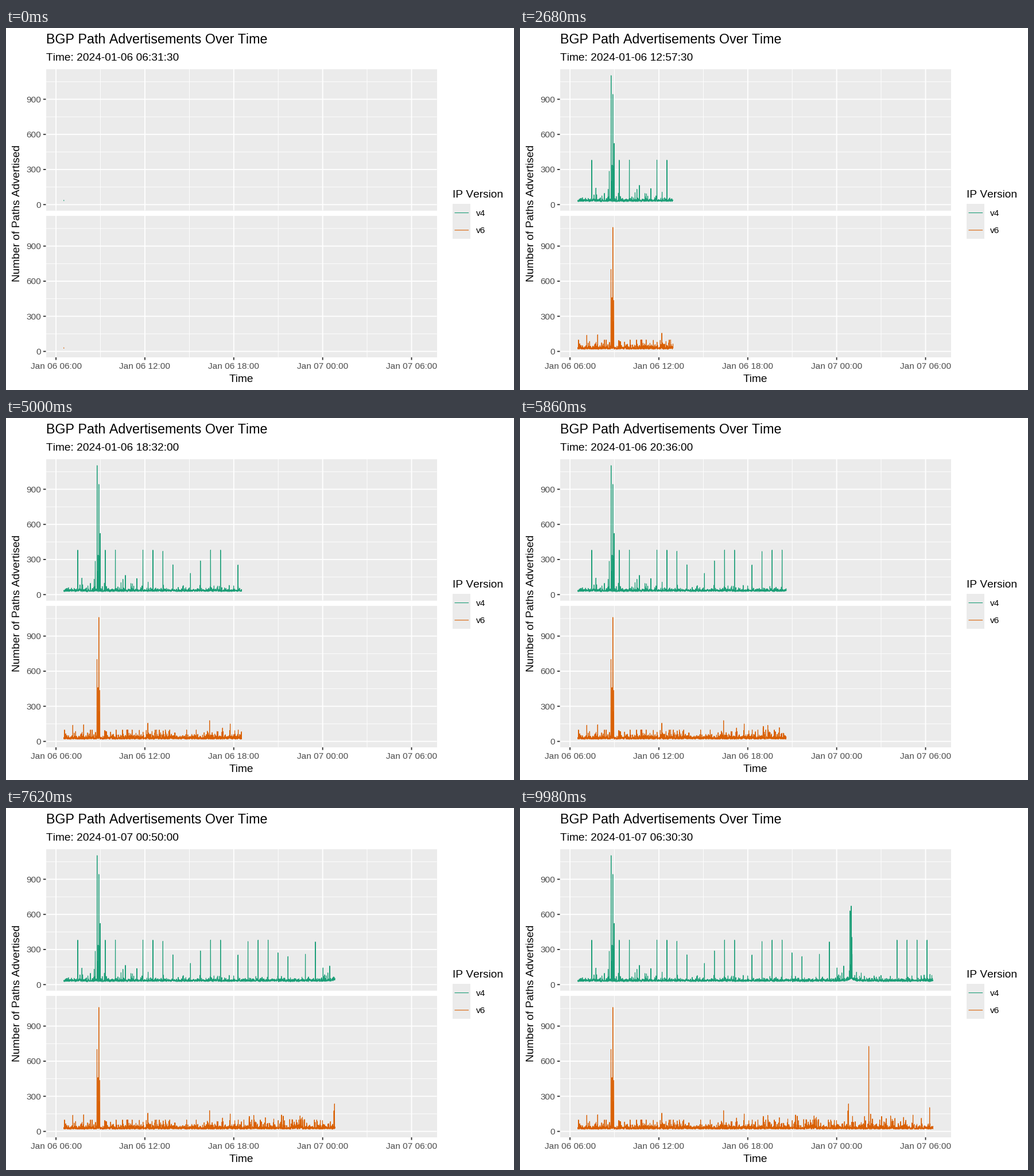
Recreate the animation shown at these times as a matplotlib script. Size 885 by 632 pixels, loop 10000 ms.

```python
import numpy as np
import matplotlib.pyplot as plt
from matplotlib.animation import FuncAnimation
from matplotlib.patches import Rectangle

plt.rcParams.update({
    "font.family": "Liberation Sans",
    "text.kerning_factor": 6,
    "path.simplify": False,
})

W, H, DPI = 885, 632, 100
FRAMES, INTERVAL = 500, 20
SAMPLES = 2879               # one sample every 30 s
START = 6 * 3600 + 31 * 60 + 30

LEFT, RIGHT = 69.7, 750.6
TOP, BOTTOM = 71.6, 318.5
PANEL_STEP = 256.3
ZERO_Y, UNIT = 308.3, 0.2043
X0 = LEFT + (RIGHT - LEFT) / 22
DX = (RIGHT - LEFT) / 1.1 / (SAMPLES - 1)

GREEN, ORANGE = "#1B9E77", "#D95F02"
PANEL, TICK, LABEL = "#EBEBEB", "#333333", "#4D4D4D"
BASE, SMALL, TITLE = 19.15, 15.45, 23.2
LINE = 1.12

# Main outliers: (x position, paths advertised)
V4_PEAKS = [(155.5, 285), (158.8, 1103), (161.8, 942), (164, 523),
            (575, 630), (577, 672), (578.6, 260)]
V6_PEAKS = [(158.4, 700), (160.2, 460), (161.8, 1060), (163.4, 435),
            (572.3, 235), (607.6, 727)]

# Evenly spaced v4 spikes: (first x, count, first height, last height)
TRAIN_STEP, TRAIN_CAP = 17.45, 380
TRAINS = [(125, 1, 380, 380), (173, 3, 600, 165), (238.5, 4, 600, 255),
          (321.4, 4, 182, 500), (404.2, 4, 253, 600), (473.8, 2, 272, 240),
          (521.6, 2, 260, 365), (656.8, 4, 400, 380)]

xs = X0 + DX * np.arange(SAMPLES)


def index(x):
    return round((x - X0) / DX)


def add_burst(values, rng, lo, hi, chance, top):
    """Scatter tall values through a short stretch."""
    hit = (xs > lo) & (xs < hi) & (rng.random(SAMPLES) < chance)
    values[hit] = rng.uniform(90, top, hit.sum())


def add_spikes(values, rng, chance, low, mean, top):
    """Seeded spikes, mostly short, some tall."""
    hit = rng.random(SAMPLES) < chance
    values[hit] = np.minimum(low + rng.exponential(mean, hit.sum()), top)


def add_peaks(values, peaks):
    for x, value in peaks:
        values[index(x)] = value


def train_peaks():
    for x, count, first, last in TRAINS:
        for i, height in enumerate(np.linspace(first, last, count)):
            yield x + i * TRAIN_STEP, min(height, TRAIN_CAP)


def make_v4():
    rng = np.random.default_rng(4)
    busy = (xs < 265) | (xs > 545)
    values = 23 + rng.gamma(3.2, 3.8, SAMPLES)
    values += 30 * np.exp(-np.abs(xs - 577) / 4)
    add_spikes(values, rng, np.where(busy, 0.09, 0.07), 40, 11, 75)
    add_spikes(values, rng, np.where(busy, 0.022, 0.003), 70, 35, 190)
    add_burst(values, rng, 158.4, 164.2, 0.35, 470)
    add_burst(values, rng, 574.6, 578, 0.35, 480)
    add_peaks(values, V4_PEAKS)
    add_peaks(values, train_peaks())
    values[:2] = 40, 30
    return values


def make_v6():
    rng = np.random.default_rng(6)
    values = 17 + rng.gamma(2.2, 5.5, SAMPLES)
    add_spikes(values, rng, 0.13, 40, 22, 98)
    add_spikes(values, rng, 0.008 + 0.01 * (xs > 400), 95, 35, 215)
    add_burst(values, rng, 158.2, 163.6, 0.25, 330)
    add_peaks(values, V6_PEAKS)
    values[:2] = 34, 24
    return values


fig = plt.figure(figsize=(W / DPI, H / DPI), dpi=DPI, facecolor="white")
ax = fig.add_axes([0, 0, 1, 1])
ax.set_xlim(0, W)
ax.set_ylim(H, 0)
ax.axis("off")


def px(size):
    return size * 72 / DPI


def text(x, y, label, size=BASE, color="black", **kw):
    return ax.text(x, y, label, fontsize=px(size), color=color,
                   va="baseline", **kw)


def box(x, y, x2, y2):
    ax.add_patch(Rectangle((x, y), x2 - x, y2 - y, fc=PANEL, lw=0))


def line(x, y, color, width, z=2):
    return ax.plot(x, y, color=color, lw=px(width), zorder=z, snap=False,
                   solid_capstyle="butt", solid_joinstyle="round")[0]


def hour_x(hour):
    return X0 + (hour * 3600 - START) / 30 * DX


def draw_panel(shift):
    top, bottom, zero = TOP + shift, BOTTOM + shift, ZERO_Y + shift
    box(LEFT, top, RIGHT, bottom)
    for value in range(150, 1051, 300):
        y = zero - value * UNIT
        line([LEFT, RIGHT], [y, y], "white", 0.93)
    for hour in range(9, 28, 6):
        line([hour_x(hour)] * 2, [top, bottom], "white", 0.93)
    for value in range(0, 901, 300):
        y = zero - value * UNIT
        line([LEFT, RIGHT], [y, y], "white", 1.87, 3)
        line([LEFT - 4.8, LEFT], [y, y], TICK, 1.87)
        text(61.2, y + 5.4, str(value), SMALL, LABEL, ha="right")
    for hour in range(6, 31, 6):
        line([hour_x(hour)] * 2, [top, bottom], "white", 1.87, 3)


draw_panel(0)
draw_panel(PANEL_STEP)

axis_y = BOTTOM + PANEL_STEP
for hour in range(6, 31, 6):
    x = hour_x(hour)
    line([x, x], [axis_y, axis_y + 4.8], TICK, 1.87)
    day = 6 + hour // 24
    text(x, 594.6, f"Jan {day:02d} {hour % 24:02d}:00", SMALL, LABEL,
         ha="center")

text(LEFT, 26.6, "BGP Path Advertisements Over Time", TITLE)
clock = text(LEFT, 56.6, "")
text((LEFT + RIGHT) / 2, 618, "Time", ha="center")
text(24.4, 323.2, "Number of Paths Advertised", rotation=90, ha="center",
     rotation_mode="anchor")

text(778.4, 295.6, "IP Version")
box(778.4, 307.4, 809.2, 368)
for name, color, y in (("v4", GREEN, 322.6), ("v6", ORANGE, 352.9)):
    line([781.5, 806.1], [y, y], color, LINE)
    text(818.6, y + 5.4, name, SMALL)

ys4 = ZERO_Y - UNIT * make_v4()
ys6 = ZERO_Y + PANEL_STEP - UNIT * make_v6()
line4 = line([], [], GREEN, LINE, 4)
line6 = line([], [], ORANGE, LINE, 4)


def update(frame):
    last = frame * (SAMPLES - 1) // (FRAMES - 1)
    end = max(last, 1) + 1
    line4.set_data(xs[:end], ys4[:end])
    line6.set_data(xs[:end], ys6[:end])
    days, secs = divmod(START + 30 * last, 86400)
    clock.set_text(f"Time: 2024-01-{6 + days:02d} {secs // 3600:02d}:"
                   f"{secs // 60 % 60:02d}:{secs % 60:02d}")
    return line4, line6, clock


anim = FuncAnimation(fig, update, frames=FRAMES, interval=INTERVAL,
                     repeat=True, repeat_delay=0, blit=False)
plt.show()
```
